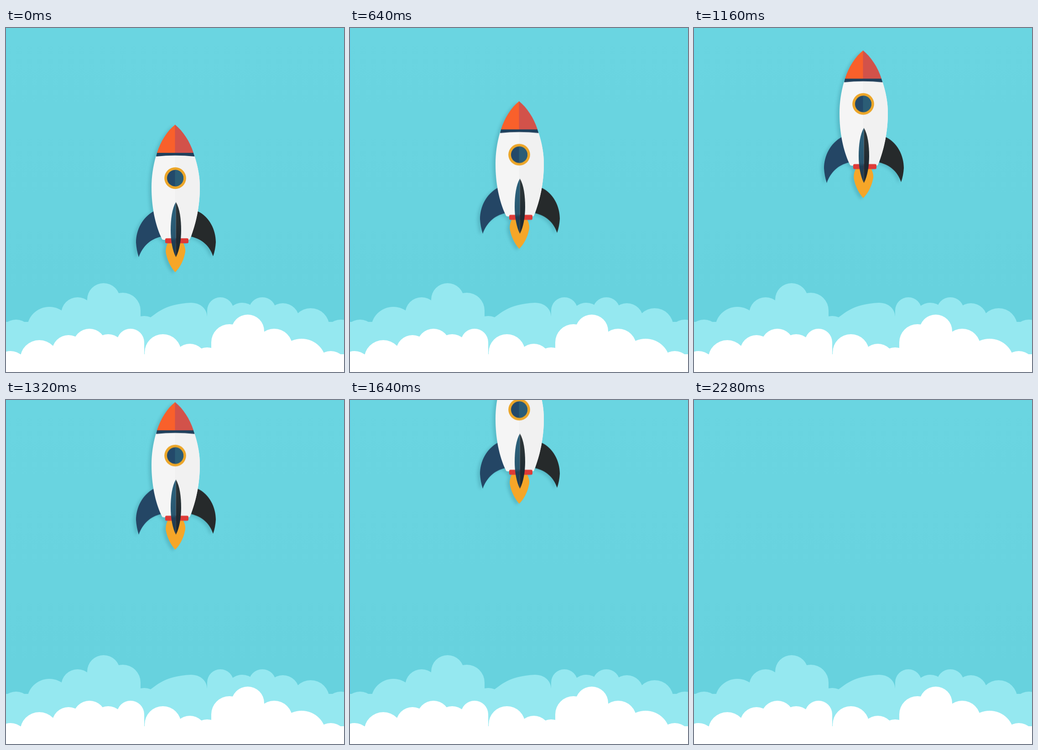
Animation, 741 px wide and 755 px high, one loop 2.8 s. Source, as an HTML page:

```html
<!DOCTYPE html>
<html lang="en">
<head>
<meta charset="utf-8">
<title>Rocket launch</title>
<style>
  html, body { margin: 0; width: 100%; height: 100%; overflow: hidden; background: #69d4e0; }
  svg { display: block; width: 100%; height: 100%; }
  #rocket { filter: blur(.5px) drop-shadow(-6px 3px 3px rgba(0, 60, 80, .16)); }
</style>
</head>
<body>
<svg viewBox="0 0 741 755" preserveAspectRatio="none">
  <defs>
    <linearGradient id="sky" x2="0" y2="1">
      <stop offset="0" stop-color="#6ad5e1"/>
      <stop offset=".8" stop-color="#67d2de"/>
    </linearGradient>
    <linearGradient id="finL" x2="0" y2="1">
      <stop offset=".25" stop-color="#2b5f79"/>
      <stop offset=".64" stop-color="#29566f"/>
      <stop offset=".7" stop-color="#203d54"/>
    </linearGradient>
    <linearGradient id="finR" x2="0" y2="1">
      <stop offset=".3" stop-color="#2a3336"/>
      <stop offset=".7" stop-color="#1e2932"/>
    </linearGradient>
    <clipPath id="right"><rect x="370.5" y="200" width="100" height="350"/></clipPath>
  </defs>

  <rect width="741" height="755" fill="url(#sky)"/>
  <rect width="1" height="650" fill="#5dd3ee"/>
  <path id="back" fill="#95e8f0"/>
  <path id="front" fill="#fff"/>

  <g id="rocket">
    <path fill="#244665" d="M324 402C299 416 285 443 285 471Q286 487 291 503C299 480 316 463 340 458Z"/>
    <path fill="#262a2b" d="M420 402C446 414 460 443 460 470Q459 487 454 501C447 479 430 463 406 458Z"/>
    <path fill="#f6a628" d="M356 470C351 477 349 488 351 496C354 511 362 526 371 536C381 526 389 511 392 496C395 488 392 477 387 470Z"/>
    <path id="body" fill="#f5f5f5" d="M329 280Q371 276 413 280C421 305 425 327 425 350C425 392 416 432 404 461Q403 465 399 465H346Q342 465 341 461C327 432 319 392 319 350C319 327 322 305 329 280Z"/>
    <use href="#body" clip-path="url(#right)" style="filter:brightness(.983)"/>
    <rect x="349" y="461.500" width="51" height="11" rx="3" fill="#de3a37"/>
    <path fill="#20405c" d="M331.500 273H410.500L413.500 282Q371 277.500 329 282Z"/>
    <path fill="#f9602b" d="M371 212C353 226 339 249 331 274H371Z"/>
    <path fill="#d2524a" d="M370.500 212C388 226 403 249 411 274H370.500Z"/>
    <circle cx="371" cy="329.500" r="23.800" fill="#eca629"/>
    <circle cx="371" cy="329.500" r="18" fill="#23496a"/>
    <circle cx="371" cy="329.500" r="18" fill="#2b5d76" clip-path="url(#right)"/>
    <path fill="url(#finL)" d="M372.500 382C364 396 361 420 361 444C361 466 365 489 372.500 503Z"/>
    <path fill="url(#finR)" d="M372.500 382C381 396 384 420 384 444C384 466 380 489 372.500 503Z"/>
  </g>
</svg>
<script>
  const $ = id => document.getElementById(id);

  // A puff is a round-topped column; a cloud is a flat bank with puffs on it.
  const puff = ([x, top, r = 36]) =>
    `M${x - r} 800V${top + r}a${r} ${r} 0 0 1 ${2 * r} 0V800Z`;
  const cloud = (id, bank, puffs, extra = '') =>
    $(id).setAttribute('d', `M0 800V${bank}H741V800Z` + puffs.map(puff).join('') + extra);

  cloud('back', 645, [
    [22, 640], [95, 612, 49], [157, 591], [214, 560], [256, 581, 39], [303, 632],
    [470, 591, 29], [518, 603], [562, 591, 30], [607, 604], [668, 615, 41], [734, 640]
  ], 'M310 800V640C330 627 346 606 405 603C428 603 441 618 441 634V800Z');

  cloud('front', 716, [
    [10, 709], [73, 685, 42], [137, 674], [183, 660], [224, 672], [273, 660, 30],
    [344, 672, 40], [403, 693], [441, 701], [490, 650, 40], [530, 629],
    [588, 660, 40], [648, 682, 54], [712, 709]
  ]);

  // Sine ease-in climb in 40 ms ticks, then an empty sky until the loop ends.
  const LOOP = 2800, TICK = 40, FLIGHT = 2280, CLIMB = 538;
  const frames = [];
  for (let t = 0; t <= LOOP; t += TICK) {
    const gone = t >= FLIGHT;
    const rise = gone ? 700 : CLIMB * (1 - Math.cos(t / FLIGHT * Math.PI / 2));
    frames.push({
      offset: t / LOOP,
      transform: `translate(0px, ${-rise.toFixed(2)}px)`,
      easing: 'steps(1, end)'
    });
  }
  $('rocket').animate(frames, { duration: LOOP, iterations: Infinity });
</script>
</body>
</html>
```
